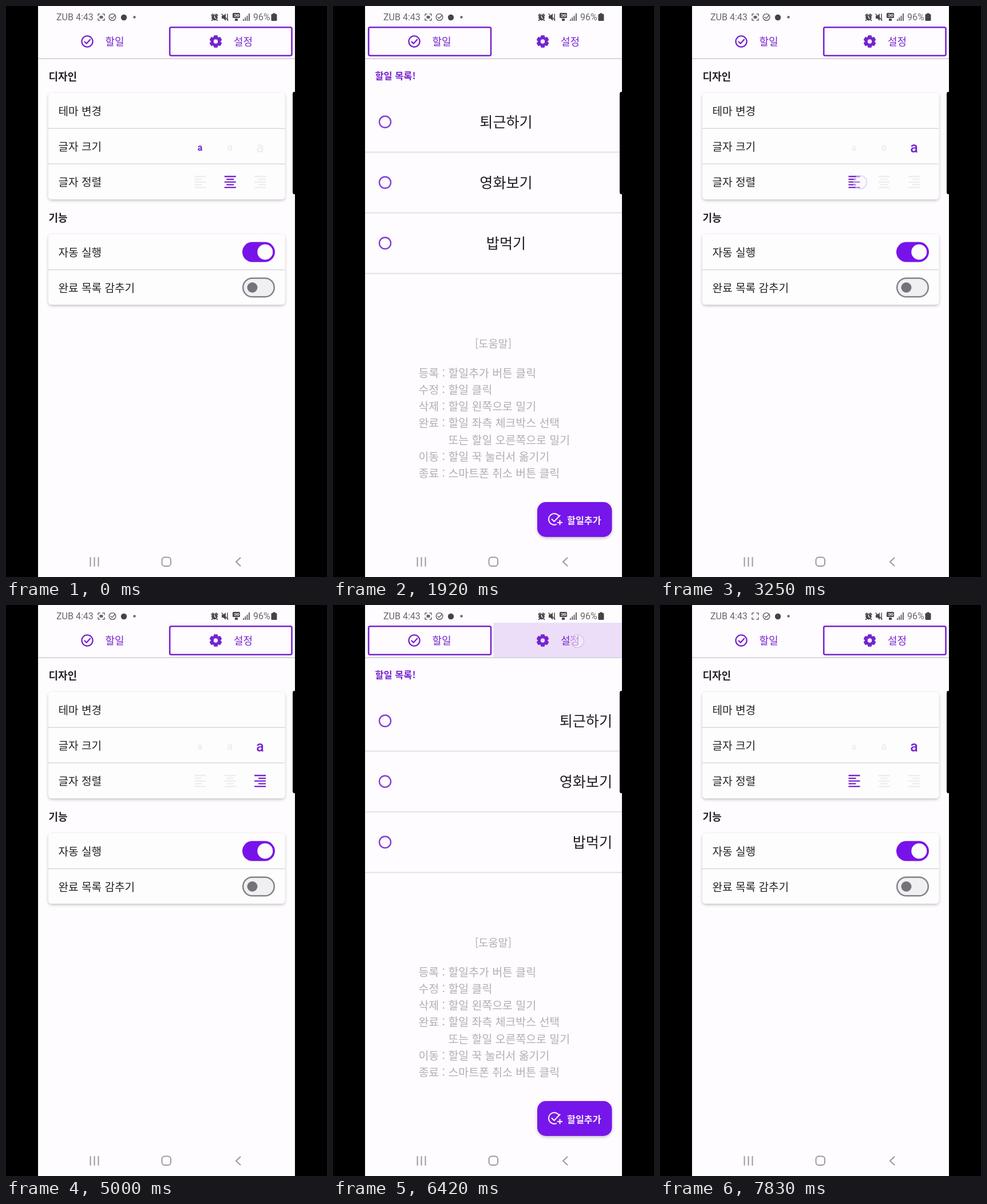
Write an HTML page that moves like this. It is 561 px wide and 998 px high and loops after 8000 ms.

```html
<!DOCTYPE html>
<html lang="ko">
<head>
<meta charset="utf-8">
<style>
  html, body { margin: 0; width: 100%; height: 100%; overflow: hidden; background: #000; }
  svg { display: block; width: 100%; height: 100%; }
  text { font-family: "Noto Sans CJK KR", "Noto Sans CJK", "Noto Sans KR", sans-serif; white-space: pre; }
  .latin { font-family: Roboto, sans-serif; }
  .line { fill: none; stroke-linecap: round; stroke-linejoin: round; }
</style>
</head>
<body>
<svg viewBox="0 0 561 998">
  <defs>
    <filter id="shadow" x="-10%" y="-15%" width="120%" height="140%">
      <feDropShadow dx="0" dy="2" stdDeviation="2.4" flood-color="#000" flood-opacity=".24"/>
    </filter>
    <clipPath id="leftTab"><rect x="56" y="31" width="224.500" height="61"/></clipPath>
    <clipPath id="rightTab"><rect x="280.500" y="31" width="224.500" height="61"/></clipPath>
  </defs>
  <rect width="561" height="998"/>
  <rect x="56" width="449" height="998" fill="#fefcfe"/>

  <g id="status" fill="#68666b">
    <text class="latin" x="88" y="25" font-size="16">ZUB 4:43</text>
    <path class="line" stroke="#68666b" stroke-width="1.500" d="M161 17v-3h3M169 14h3v3M172 22v3h-3M164 25h-3v-3"/>
    <rect id="captureDot" x="163.500" y="17" width="6" height="5" rx="1.500"/>
    <circle cx="186" cy="19.500" r="5.800" fill="none" stroke="#68666b" stroke-width="1.500"/>
    <path class="line" stroke="#68666b" stroke-width="1.500" d="M183 19.500l2.300 2.300 5-5.300"/>
    <circle cx="206" cy="20" r="5.200" fill="#454348"/>
    <circle cx="224.500" cy="19.500" r="2.200"/>
    <g fill="#4a484d">
      <circle cx="364.500" cy="20" r="5.300"/>
      <path d="M358 16l4-3 1 1.500-4 3zM371 16l-4-3-1 1.500 4 3zM359 24h2v2h-2zM368 24h2v2h-2z"/>
      <path class="line" stroke="#fff" stroke-width="1.200" d="M364.500 17v3.200l2 1.500"/>
      <path d="M377 17h3l4-4v13l-4-4h-3z"/>
      <path class="line" stroke="#4a484d" stroke-width="1.500" d="M377 14l11 11M387 14v11"/>
      <rect x="396" y="12" width="13" height="9" rx="1.500"/>
      <path d="M400 22h5v4h-5z"/>
      <path class="line" stroke="#fff" d="M399 15h3v3h-3M404 15h3v3h-3z"/>
    </g>
    <path d="M414 23h2v3h-2zM417.300 20h2v6h-2zM420.600 17h2v9h-2zM424 13h2v13h-2z"/>
    <text class="latin" x="432" y="25" font-size="16">96%</text>
    <path fill="#454348" d="M466.500 12.500h4v1.500h1.500q1.500 0 1.500 1.500v9q0 1.500-1.500 1.500h-7q-1.500 0-1.500-1.500v-9q0-1.500 1.500-1.500h1.500z"/>
  </g>

  <g clip-path="url(#leftTab)"><circle id="leftRipple" fill="#ecdef8"/></g>
  <g clip-path="url(#rightTab)"><circle id="rightRipple" fill="#ecdef8"/></g>
  <rect x="56" y="91" width="449" height="2" fill="#d9d6dc"/>
  <g id="tabs" fill="#7624cf">
    <circle cx="142" cy="62" r="9.600" fill="none" stroke="#7624cf" stroke-width="2.300"/>
    <path class="line" stroke="#7624cf" stroke-width="2.300" d="M137.500 62.500l3.200 3.200 6.300-7"/>
    <text x="173.500" y="68.500" font-size="18" font-weight="500">할일</text>
    <g id="gear" transform="translate(366.500 62)"></g>
    <text x="398" y="68.500" font-size="18" font-weight="500">설정</text>
  </g>
  <rect id="indicator" y="37.200" height="49.600" rx="2.500" fill="none" stroke="#7624cf" stroke-width="2.600"/>

  <g id="settings"></g>
  <g id="todo"></g>

  <path d="M505 150h-1q-3 0-3 4v171q0 4 3 4h1z"/>
  <g class="line" stroke="#9b999d" stroke-width="2">
    <path d="M147.500 964v15M154.500 964v15M161.500 964v15M409.500 964.500l-7.500 7 7.500 7"/>
    <rect x="272.500" y="963.500" width="15.500" height="15.500" rx="5"/>
  </g>
  <circle id="touch" r="11.500" fill="#f8f2fc" fill-opacity=".5" stroke="#d8c9e6" stroke-width="1.600"/>
</svg>
<script>
const LOOP = 8000, FRAME = 1000 / 12;
const PURPLE = '#7624cf', SOLID = '#7713ea', FAINT = '#ededf0';
const DELAY = 130;      // from finger down to reaction
const SWITCH = 300;     // length of a screen change
const SLIDE = 390;      // travel time of each indicator edge
const LAG = 0.46;       // head start of the leading edge, in slides
const $ = id => document.getElementById(id);
const clamp = v => Math.max(0, Math.min(1, v));
const smooth = v => (v = clamp(v), v * v * (3 - 2 * v));

const taps = [
  { at: 60, x: 455, y: 249, size: 2 },
  { at: 1110, x: 207, y: 58, screen: 'todo' },
  { at: 2130, x: 427, y: 63, screen: 'settings' },
  { at: 3030, x: 350, y: 308, align: 0 },
  { at: 3830, x: 401, y: 308, align: 1 },
  { at: 4440, x: 456, y: 308, align: 2 },
  { at: 5110, x: 207, y: 58, screen: 'todo' },
  { at: 6310, x: 427, y: 63, screen: 'settings' },
  { at: 7370, x: 350, y: 308, align: 0 }
];

const label = (x, y, size, string, extra = '') =>
  `<text x="${x}" y="${y}" font-size="${size}" ${extra}>${string}</text>`;
const divider = (y, x = 74, w = 413) =>
  `<rect x="${x}" y="${y - 1}" width="${w}" height="2" fill="#e2e0e4"/>`;
const card = (y, h) =>
  `<rect x="74" y="${y}" width="413.500" height="${h}" rx="6" fill="#fefdfe" filter="url(#shadow)"/>`;

function alignIcon(index) {
  const cx = 339.5 + index * 52.3;
  let d = '';
  for (let i = 0; i < 5; i++) {
    const w = i % 2 ? 13 : 20;
    const x = cx - 10 + (20 - w) * index / 2;
    d += `M${x} ${298 + i * 4.8}h${w}`;
  }
  return `<path id="align${index}" d="${d}" fill="none" stroke-width="2.300"/>`;
}

function buildSettings() {
  const rows = [['테마 변경', 191], ['글자 크기', 253], ['글자 정렬', 315],
    ['자동 실행', 437.5], ['완료 목록 감추기', 499.5]];
  const sizes = [16, 19, 25];
  $('settings').innerHTML =
    label(74.5, 129.5, 18, '디자인', 'font-weight="700" fill="#242227"') +
    label(74.5, 376.5, 18, '기능', 'font-weight="700" fill="#242227"') +
    card(152, 186) + divider(214) + divider(276) +
    card(399, 123) + divider(461) +
    rows.map(([s, y]) => label(91.5, y, 19.1, s, 'font-weight="500" fill="#242227"')).join('') +
    sizes.map((size, i) => label(339 + i * 52.5, [252.5, 253, 256][i], size, 'a',
      `id="size${i}" class="latin" font-weight="${i ? 500 : 700}" text-anchor="middle"`)).join('') +
    [0, 1, 2].map(alignIcon).join('') +
    `<rect x="413" y="412.500" width="57" height="35" rx="17.500" fill="${SOLID}"/>
     <circle cx="452.800" cy="430" r="13.500" fill="#fefdfe"/>
     <rect x="414.200" y="475.700" width="54.600" height="32.600" rx="16.300" fill="#f0eff2" stroke="#848288" stroke-width="2.500"/>
     <circle cx="430.500" cy="492" r="9" fill="#75727a"/>`;
}

function buildTodo() {
  const items = ['퇴근하기', '영화보기', '밥먹기'];
  const help = ['등록 : 할일추가 버튼 클릭', '수정 : 할일 클릭', '삭제 : 할일 왼쪽으로 밀기',
    '완료 : 할일 좌측 체크박스 선택', '또는 할일 오른쪽으로 밀기',
    '이동 : 할일 꾹 눌러서 옮기기', '종료 : 스마트폰 취소 버튼 클릭'];
  const gray = 'fill="#b1afb4"';
  $('todo').innerHTML =
    label(73.5, 127.5, 16.4, '할일 목록!', `font-weight="700" fill="${PURPLE}"`) +
    items.map((s, i) => {
      const y = 202.5 + i * 106;
      return `<circle cx="91" cy="${y}" r="10" fill="none" stroke="#8440d6" stroke-width="2.400"/>` +
        label(0, y + 9.5, 25.1, s, 'class="item" font-weight="500" fill="#1d1b20"') + divider(y + 53, 56, 449);
    }).join('') +
    label(280, 597, 18.6, '[도움말]', `text-anchor="middle" ${gray}`) +
    help.map((s, i) => label(i === 4 ? 201.5 : 149.5, 649 + i * 29.15, 19.4, s, gray)).join('') +
    `<rect x="357" y="867" width="130.500" height="61" rx="15" fill="${SOLID}" filter="url(#shadow)"/>
     <g class="line" stroke="#f3eafd" stroke-width="2.200">
       <path d="M394.500 891a9.800 9.800 0 1 0-4.500 15.200M382.500 897l4 4 10-10.500M396.500 899v7.500M392.700 902.800h7.500"/>
     </g>` +
    label(409, 904.5, 16.2, '할일추가', 'font-weight="700" fill="#f6f0fd"');
}

function buildGear() {
  let teeth = '';
  for (let a = 0; a < 360; a += 60)
    teeth += `<path d="M-3-10.800h6l1.500 5h-9z" transform="rotate(${a})"/>`;
  $('gear').innerHTML = teeth +
    `<circle r="6" fill="none" stroke="${PURPLE}" stroke-width="4.600"/>`;
}

function drawRipple(id, tap, age) {
  const ripple = $(id);
  ripple.setAttribute('cx', tap.x);
  ripple.setAttribute('cy', tap.y);
  ripple.setAttribute('r', 240 * clamp(age / 100));
  ripple.setAttribute('opacity', clamp((650 - age) / 250));
}

function drawIndicator(slide, toSettings) {
  const lead = smooth(slide), lag = smooth(slide - LAG);
  const left = toSettings ? 62.2 + 224 * lag : 286.2 - 224 * lead;
  const right = toSettings ? 276 + 223.5 * lead : 499.5 - 223.5 * lag;
  $('indicator').setAttribute('x', left);
  $('indicator').setAttribute('width', right - left);
}

function draw(time) {
  const t = Math.floor((time + 5) / FRAME) * FRAME;
  let size = 0, align = 1, progress = 1, slide = 2, toSettings = true, touch = null;
  $('leftRipple').setAttribute('opacity', 0);
  $('rightRipple').setAttribute('opacity', 0);

  for (const tap of taps) {
    const age = t - tap.at;
    if (age < 0) break;
    touch = tap;
    if (tap.screen) drawRipple(tap.screen === 'todo' ? 'leftRipple' : 'rightRipple', tap, age);
    if (age < DELAY) continue;
    if ('size' in tap) size = tap.size;
    if ('align' in tap) align = tap.align;
    if (tap.screen) {
      toSettings = tap.screen === 'settings';
      progress = clamp((age - DELAY) / SWITCH);
      slide = age / SLIDE;
    }
  }

  const shown = toSettings ? progress : 1 - progress;
  $('settings').setAttribute('opacity', shown);
  $('todo').setAttribute('opacity', (1 - shown) ** 1.4);
  drawIndicator(slide, toSettings);

  for (let i = 0; i < 3; i++) {
    $('size' + i).setAttribute('fill', i === size ? PURPLE : FAINT);
    $('align' + i).setAttribute('stroke', i === align ? PURPLE : FAINT);
  }
  for (const item of document.querySelectorAll('.item')) {
    item.setAttribute('x', [117, 302.5, 488][align]);
    item.setAttribute('text-anchor', ['start', 'middle', 'end'][align]);
  }

  $('touch').setAttribute('opacity', touch ? clamp((300 - (t - touch.at)) / 100) : 0);
  if (touch) {
    $('touch').setAttribute('cx', touch.x);
    $('touch').setAttribute('cy', touch.y);
  }
  const beat = (t + 1) % 1000;
  $('captureDot').setAttribute('opacity', beat > 660 && beat < 910 ? 0 : 1);
}

buildSettings();
buildTodo();
buildGear();
const start = performance.now();
function tick() {
  draw((performance.now() - start) % LOOP);
  requestAnimationFrame(tick);
}
tick();
</script>
</body>
</html>
```
